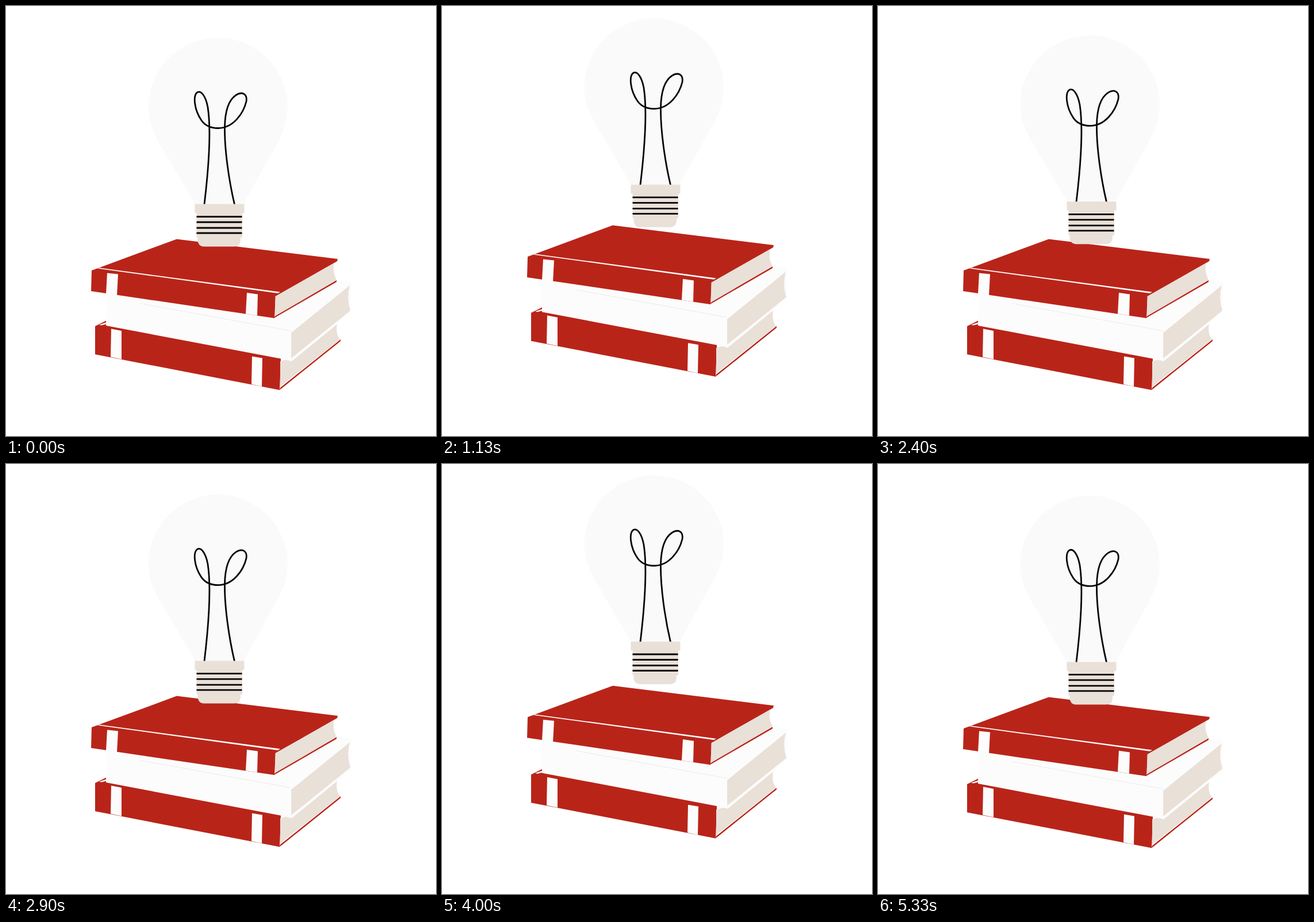
Animation, 748 px wide and 748 px high, one loop 5.41 s. Source, as an HTML page:

```html
<!DOCTYPE html>
<html lang="en">
<head>
<meta charset="utf-8">
<title>Bulb on books</title>
<style>
  html, body { margin: 0; width: 100%; height: 100%; overflow: hidden; background: #fff; }
  svg { display: block; width: 100vw; height: 100vh; }
  .red { fill: #b92419; }
  .white { fill: #fcfcfc; }
  .page { fill: #e9e0d8; }
  .glass { fill: #fafafa; }
  .wire { fill: none; stroke: #050505; stroke-width: 2.8; }
  .seam { fill: none; stroke: #e9e6e4; stroke-width: .8; }
</style>
</head>
<body>
<svg viewBox="0 0 748 748">
  <g id="low">
    <path class="red" d="M155 606V557L174 547.500L478 600V618L476 668Z"/>
    <path class="white" d="M162 554.500L174 550.500V553.500L166 555.500Z"/>
    <path class="page" d="M477 618L497 612L576 552Q573 570 581 580L477 662Z"/>
    <path class="red" d="M476 668L582 583V580L477 664Z"/>
    <path class="white" d="M183 561.500L201 565V614.500L182 610.500ZM428 609.500L446 612.500L445 662L427 658Z"/>
  </g>
  <g id="mid">
    <path class="white" d="M174 500L300 440L575 476L600 480V534L497 618L478 613.500L174 556Z"/>
    <path class="page" d="M496 568.500L598 486Q592 508 599 530L496 613Z"/>
    <path class="seam" d="M234 517.500L495 565"/>
  </g>
  <g id="top">
    <path class="red" d="M148 496L149 460L160 456L297 405.500L577 440L576 444L469 505L467 543Z"/>
    <path class="page" d="M468.500 505L571 447Q567 463 575 476L468 539.500Z"/>
    <path class="red" d="M466 543L575 480V477L468 539.500Z"/>
    <path class="white" d="M159 456.500L163 455.500L477 497.500L473 499.800Z"/>
    <path class="white" d="M176 464.500L195 466.500L193 503.500L174 500.500ZM419 498.800L438 501.500L437 538.500L417 535.500Z"/>
  </g>
  <g id="bulb">
    <path class="glass" d="M329 345L274 251C256 222 247.500 200 247.500 173A121.300 121.300 0 0 1 490 173C490 200 481 225 465 251L413 345Z"/>
    <path class="wire" d="M345 345C354 270 357 215 351 176C347 155 339 147 333 150C325 155 327 180 340 199C347 209 358 212.500 369 212.500C395 212.500 413 187 418 166C420 153 411 148 400 155C388 163 381 182 380.500 211C380 250 388 305 397.500 345"/>
    <path class="page" d="M328.500 344.500H414.500V360H411V403H408V408Q407 418.500 397 418.500H344Q334.500 418 333.500 408V403H331.500V360H328.500Z"/>
    <path class="wire" d="M331.500 366.500H410.500M331.500 376H410.500M331.500 386H410.500M331.500 395H410.500"/>
  </g>
</svg>
<script>
  const LOOP = 5410, CYCLE = 54, LAST = 107;
  const PEAK = 20, PEAK_LIFT = 25.6, SPLIT = 16;
  const parts = ["bulb", "top", "mid", "low"].map(id => document.getElementById(id));
  const landing = [39, 37, 35];

  const bulbLift = n => 17.8 * (1 - Math.cos(2 * Math.PI * n / CYCLE));

  // Books ride up with the bulb, slow to a peak, then settle one after another.
  function bookLift(n, end) {
    if (n <= SPLIT) return bulbLift(n);
    if (n >= end) return 0;
    if (n >= PEAK) return PEAK_LIFT * (1 + Math.cos(Math.PI * (n - PEAK) / (end - PEAK))) / 2;
    const span = PEAK - SPLIT, u = (n - SPLIT) / span;
    const start = bulbLift(SPLIT), speed = (start - bulbLift(SPLIT - 1)) * span;
    return start + (PEAK_LIFT - start) * u * u * (3 - 2 * u) + speed * u * (1 - u) ** 2;
  }

  // Poses last 30 and 70 ms in turn.
  function step(ms) {
    const n = 2 * Math.floor(ms / 100) + (ms % 100 >= 30 ? 1 : 0);
    return Math.min(n, LAST) % CYCLE;
  }

  const t0 = performance.now();
  function draw() {
    const n = step((performance.now() - t0) % LOOP);
    const lifts = [bulbLift(n), ...landing.map(end => bookLift(n, end))];
    parts.forEach((part, i) => part.setAttribute("transform", `translate(0 ${(-lifts[i]).toFixed(2)})`));
    requestAnimationFrame(draw);
  }
  draw();
</script>
</body>
</html>
```
